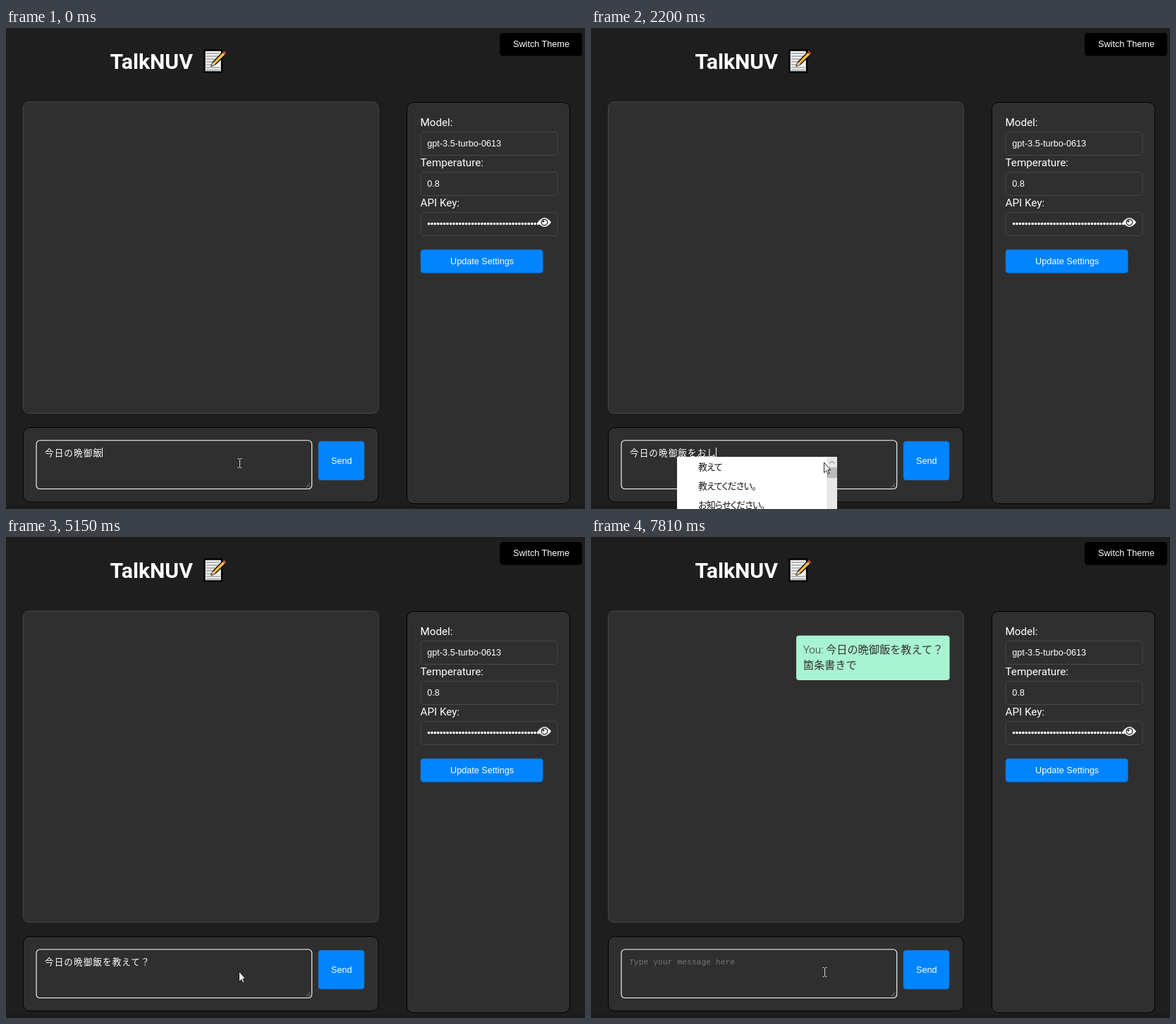
Write an HTML page that moves like this. It is 821 px wide and 682 px high and loops after 8000 ms.

```html
<!DOCTYPE html>
<html lang="ja">
<head>
<meta charset="utf-8">
<title>Chat</title>
<style>
  html, body { margin: 0; width: 100%; height: 100%; overflow: hidden; background: #1e1e1e; }
  svg { display: block; }
  text { fill: #fff; white-space: pre; }
  .ui { font: 12.67px "Liberation Sans", Arial, sans-serif; }
  .label { font: 15.2px Roboto, sans-serif; }
  .title { font: 700 30.2px Roboto, sans-serif; }
  .typed { font: 300 12.6px "Noto Sans CJK JP", "Noto Sans CJK", sans-serif; letter-spacing: 1.07px; }
  .hint { font: 11.39px "Liberation Mono", monospace; fill: #757575; }
  .bubble text { font: 300 15.2px Roboto, "Noto Sans CJK JP", "Noto Sans CJK", sans-serif; fill: #333; }
  .popup text { font: 13px "Noto Sans CJK JP", "Noto Sans CJK", sans-serif; fill: #111;
    font-feature-settings: "palt"; letter-spacing: -.8px; }
  .panel { fill: #2f2f2f; stroke: #000; }
  .field { fill: #2f2f2f; stroke: #484848; }
  .button { fill: #0084ff; stroke: #1b6fc0; stroke-width: .6; }
</style>
</head>
<body>
<svg width="821" height="682" viewBox="0 0 821 682">
  <rect width="821" height="682" fill="#1e1e1e"/>
  <rect y="677" width="821" height="5" fill="#1b1b1b"/>

  <text class="title" x="147.5" y="57.5">TalkNUV</text>
  <g stroke-linejoin="round" stroke-linecap="round">
    <path d="M281.5 31.5H306V62.5H281.5Z" fill="#f4f2ee" stroke="#000" stroke-width="2.4"/>
    <path d="M284.5 36H302M284.5 40H301M284.5 44H297M284.5 48H294M284.5 52H292M284.5 56H303M284.5 59.5H303" stroke="#9aa3a8" stroke-width="1.4"/>
    <path d="M291 54L293.5 48.5L307.5 34L311.5 37.5L297 51.5Z" fill="#fbc13c" stroke="#111" stroke-width="1.6"/>
    <path d="M307.5 34L309 32.8L312 35.5L311.5 37.5Z" fill="#e8594f"/>
    <path d="M291 54L293.5 48.5L297 51.5Z" fill="#e8c9a0"/>
  </g>

  <rect x="700" y="7" width="117" height="32.5" rx="4.5"/>
  <text class="ui" x="719" y="27.3">Switch Theme</text>

  <rect class="field" x="24.5" y="105" width="503.5" height="441.3" rx="8"/>
  <rect class="panel" x="24.5" y="566.5" width="503.5" height="105.5" rx="9"/>
  <rect class="panel" x="568.5" y="105.5" width="231" height="569" rx="9"/>

  <text class="label" x="587.5" y="138.7">Model:</text>
  <rect class="field" x="588" y="147.3" width="194" height="33.2" rx="4.5"/>
  <text class="ui" x="597.3" y="167.7">gpt-3.5-turbo-0613</text>
  <text class="label" x="587.5" y="195.7">Temperature:</text>
  <rect class="field" x="588" y="204.5" width="194" height="33" rx="4.5"/>
  <text class="ui" x="597.3" y="225">0.8</text>
  <text class="label" x="587.5" y="252.7">API Key:</text>
  <rect class="field" x="588" y="261.3" width="194" height="33.2" rx="4.5"/>
  <path d="M599.5 277.5H756" stroke="#fff" stroke-width="3.7" stroke-linecap="round" stroke-dasharray="0 4.43"/>
  <path d="M754 275.5Q763.5 262.5 773 275.5Q763.5 288.5 754 275.5Z" fill="#fff"/>
  <circle cx="763.5" cy="275.5" r="4.3" fill="#fff" stroke="#2f2f2f" stroke-width="1.4"/>
  <circle cx="762" cy="274" r="1.6" fill="#2f2f2f"/>
  <rect class="button" x="588" y="314.3" width="173.3" height="33" rx="4"/>
  <text class="ui" x="630" y="335">Update Settings</text>

  <rect x="43" y="584.8" width="390.7" height="68.7" rx="5" fill="#2f2f2f" stroke="#fff" stroke-width="1.1"/>
  <path d="M425.5 651.5L431.5 645.5M429 651.5L431.5 649" stroke="#999" stroke-width=".9"/>
  <rect class="button" x="443" y="586" width="65" height="55" rx="4"/>
  <text class="ui" x="461" y="617.7">Send</text>

  <text class="hint" id="hint" x="54" y="606.3">Type your message here</text>
  <text class="typed" id="line0" x="55" y="606.6"></text>
  <text class="typed" id="line1" x="55" y="619.6"></text>
  <path id="underline" stroke="#e4e4e4" stroke-dasharray="2 1"/>
  <rect id="caret" width="1" height="13" fill="#fff"/>

  <g class="bubble" id="bubble">
    <rect x="291" y="139.7" width="217.5" height="63.3" rx="4" fill="#a8f3d1"/>
    <text x="300.7" y="165.3">You: 今日の晩御飯を教えて？</text>
    <text x="300.7" y="187.3">箇条書きで</text>
  </g>

  <g class="popup" id="popup"></g>
  <path id="beam" d="M328.5 610.5H330.5L331.5 611.5L332.5 610.5H334.5M331.5 611.5V622.5M328.5 623.5H330.5L331.5 622.5L332.5 623.5H334.5" fill="none" stroke="#d0d0d0"/>
  <path id="arrow" d="M330.5 616V630.5L333.7 627.4L336 632.3L338 631.3L335.8 626.6H339.6Z" fill="#fff" stroke="#111" stroke-width=".9"/>
</svg>
<script>
const LOOP = 8000, CELL = 13.67, ORIGIN = 54.4;
const el = id => document.getElementById(id);

const ask = '今日の晩御飯', askO = ask + 'を', asked = askO + '教えて？';
const list = (right, thumb, ...rows) => ({ right, thumb, rows });
const teach = ['教えて', '教えてください。', '教えてください'];
const itemize = ['箇条書きで教えて', '過剰'];

const lists = {
  wo: list(287, 18, 'を', 'をお願いします', 'をください'),
  o: list(295, 15, 'お願いします。', 'お疲れ様です。', 'お世話になります'),
  os: list(295, 15, 'お知らせ', 'お世話になります', 'お疲れ様です。'),
  osi: list(349, 15, '教えて', '教えてください。', 'お知らせください。'),
  osie: list(349, 20, ...teach),
  osiete: list(349, 27, ...teach),
  mark: list(338, 60, '?', '❓', '?!'),
  ka: list(196, 15, 'から', '確認'),
  kajo: list(196, 16, ...itemize),
  gaki: list(196, 26, '箇条書き', '箇条書きで')
};

// time, committed lines, composing text, candidate list, options
const steps = [
  [0, [ask]],
  [560, [ask], 'ｗ'],
  [680, [ask], 'を', lists.wo],
  [950, [askO]],
  [1510, [askO], '', null, { caret: false }],
  [1660, [askO], 'お'],
  [1780, [askO], 'お', lists.o],
  [1930, [askO], 'おｓ', lists.os],
  [2080, [askO], 'おし', lists.os],
  [2200, [askO], 'おし', lists.osi],
  [2480, [askO], 'おしえ', lists.osie],
  [2630, [askO], 'おしえｔ', lists.osie],
  [2750, [askO], 'おしえて', lists.osie],
  [2870, [askO], 'おしえて', lists.osiete],
  [3020, [askO], '教えて'],
  [3290, [askO + '教えて']],
  [3850, [askO + '教えて'], '？', lists.mark],
  [4160, [asked]],
  [4600, [asked], '', null, { caret: false }],
  [4750, [asked, '']],
  [5150, [asked, ''], '', null, { caret: false }],
  [5740, [asked, ''], 'か', lists.ka],
  [6020, [asked, ''], 'かｊ', lists.ka],
  [6140, [asked, ''], 'かじょ', lists.kajo],
  [6260, [asked, ''], 'かじょう', lists.kajo],
  [6380, [asked, ''], 'かじょうｇ', lists.kajo],
  [6500, [asked, ''], 'かじょうが', lists.gaki],
  [6620, [asked, ''], 'かじょうがｋ', lists.gaki],
  [6770, [asked, ''], 'かじょうがき', lists.gaki],
  [7050, [asked, ''], 'かじょうがきで', lists.gaki],
  [7170, [asked, ''], '箇条書きで'],
  [7290, [asked, '箇条書きで']],
  [7690, [''], '', null, { caret: false, sent: true }]
];

const show = (id, on) => el(id).style.display = on ? '' : 'none';
const columnX = n => Math.round(ORIGIN + n * CELL);

function candidate(text, x, y) {
  return text === '❓'
    ? `<text x="${x + 1}" y="${y}" style="font:900 15px 'Noto Sans',sans-serif;fill:#e0332b;stroke:#300;stroke-width:1">?</text>`
    : `<text x="${x}" y="${y}">${text}</text>`;
}

function popupMarkup({ right, thumb, rows }, left, top) {
  const bar = right - 14.5, mid = right - 7.5;
  return `<rect x="${left}" y="${top}" width="${right - left}" height="90" fill="#fff"/>
    <rect x="${bar}" y="${top}" width="14.5" height="90" fill="#e7e7e7"/>
    <rect x="${bar}" y="${top + 15}" width="14.5" height="${thumb}" fill="#bababa"/>
    <path d="M${mid - 3.5} ${top + 9.5}l3.5-3.5l3.5 3.5" fill="none" stroke="#666"/>` +
    rows.map((row, i) => candidate(row, left + 30, top + 18.7 + 27.2 * i)).join('');
}

function render([time, lines, composing = '', popup, { caret = true, sent = false } = {}]) {
  const row = lines.length - 1, start = lines[row].length;
  const top = 595 + 13 * row, x0 = columnX(start), x1 = columnX(start + composing.length);
  for (const i of [0, 1]) {
    el('line' + i).textContent = (lines[i] || '') + (i === row ? composing : '');
  }
  el('underline').setAttribute('d', composing ? `M${x0} ${top + 12.5}H${x1}` : '');
  el('caret').setAttribute('x', x1);
  el('caret').setAttribute('y', top);
  el('popup').innerHTML = popup ? popupMarkup(popup, x0 - 28, top + 13) : '';
  show('caret', caret);
  show('hint', sent);
  show('bubble', sent);
  const overList = time >= 2200 && time < 5740;
  show('arrow', overList);
  show('beam', !overList);
}

let current;
function tick() {
  const t = performance.now() % LOOP;
  const step = steps.findLast(s => s[0] <= t);
  if (step !== current) render(current = step);
  requestAnimationFrame(tick);
}
tick();
</script>
</body>
</html>
```
